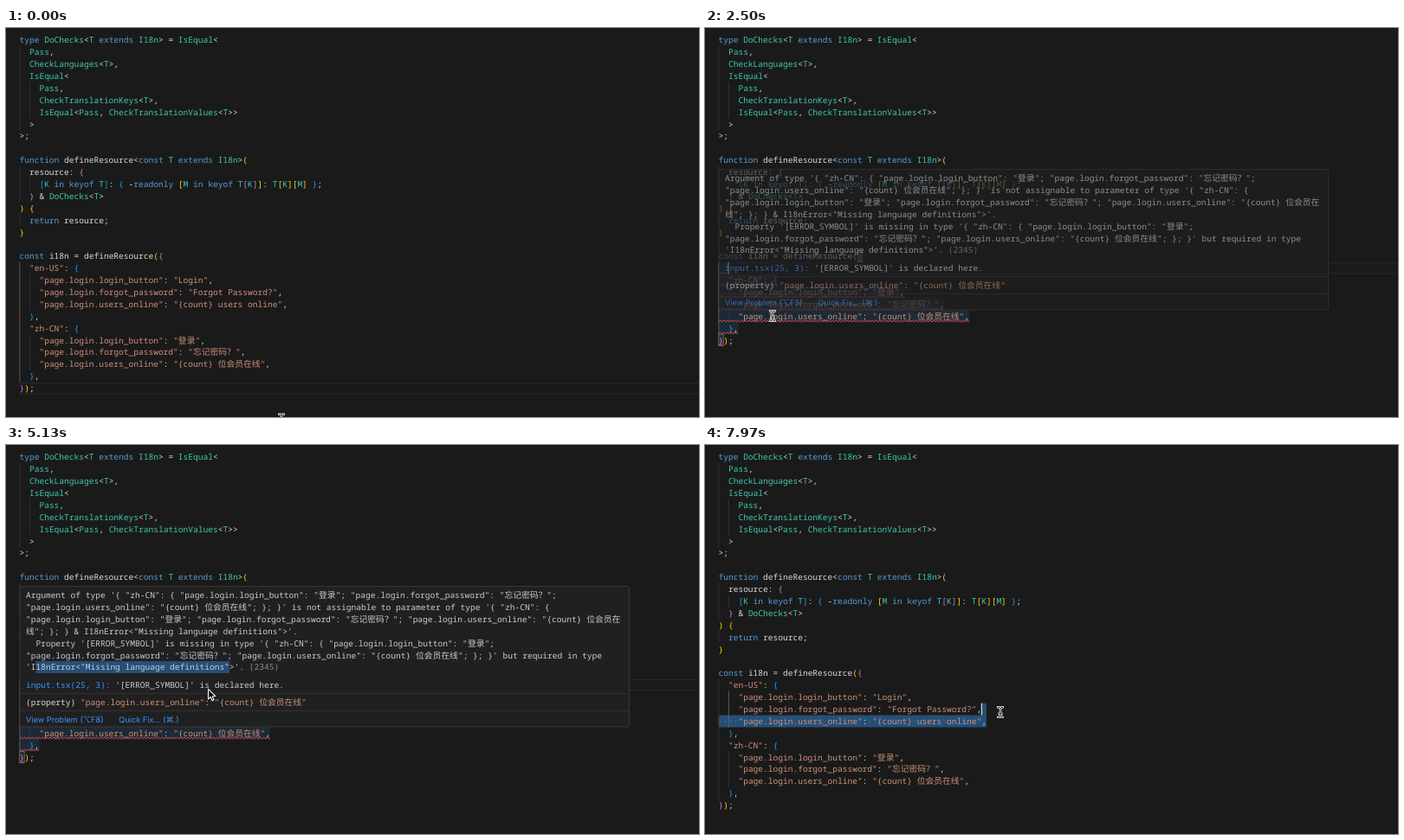
Write an HTML page with a canvas that moves like this. It is 800 px wide and 450 px high and loops after 8 s.

```html
<!DOCTYPE html>
<html lang="en">
<head>
<meta charset="utf-8">
<title>Typed translations</title>
<style>
  html, body { margin: 0; width: 100%; height: 100%; overflow: hidden; background: #1a1a1a; }
  canvas { display: block; }
</style>
</head>
<body>
<canvas id="stage" width="800" height="450"></canvas>
<script>
const ctx = document.getElementById('stage').getContext('2d');
ctx.textRendering = 'geometricPrecision';

const LOOP = 8000;
const LEFT = 15.5, TOP = 6.95, LINE = 13.89, BASE = 10.35;
const CHAR = 5.73, WIDE = 9.78;
const MONO = '9.55px "Noto Sans Mono", monospace';
const CJK = '9.78px "Noto Sans CJK SC", "Noto Sans CJK", sans-serif';
const UI = '9.2px Inter, "DejaVu Sans", sans-serif';
const C = {
  bg: '#1a1a1a', text: '#d8d8d8', keyword: '#569cd6', type: '#3dc9b0', string: '#ce9178',
  brackets: ['#ffd700', '#da70d6', '#179fff'], guide: '#363636', activeGuide: '#686868',
  lineBorder: '#282828', select: '#264f78', hover: 'rgba(38,79,120,.3)', error: '#f14c4c',
  link: '#3794ff', dim: '#8c8c8c'
};

// Moments of the edit
const PRESS = 760, RELEASE = 1300, CUT = 1500, ERROR_ON = 2150, POP_ON = 2430, POP_OFF = 5520,
  POP_DRAG = 3700, POP_DROP = 4600, UNDO = 5930, ERROR_OFF = 6480, CLICK = 6680, PRESS2 = 7550;

const head = `type DoChecks<T extends I18n> = IsEqual<
  Pass,
  CheckLanguages<T>,
  IsEqual<
    Pass,
    CheckTranslationKeys<T>,
    IsEqual<Pass, CheckTranslationValues<T>>
  >
>;

function defineResource<const T extends I18n>(
  resource: {
    [K in keyof T]: { -readonly [M in keyof T[K]]: T[K][M] };
  } & DoChecks<T>
) {
  return resource;
}

const i18n = defineResource({`;
const english = `  "en-US": {
    "page.login.login_button": "Login",
    "page.login.forgot_password": "Forgot Password?",
    "page.login.users_online": "{count} users online",
  },`;
const chinese = `  "zh-CN": {
    "page.login.login_button": "登录",
    "page.login.forgot_password": "忘记密码？",
    "page.login.users_online": "{count} 位会员在线",
  },
});`;

function colorize(line, state) {
  const parts = line.match(/"[^"]*"|\w+|\s+|[^\w\s"]/g) || [];
  return parts.map(s => {
    let color = C.text;
    if (s[0] === '"') color = C.string;
    else if (/^(type|extends|function|const|in|keyof|readonly|return)$/.test(s)) color = C.keyword;
    else if (/^(DoChecks|IsEqual|Pass|Check\w+|I18n|[TKM])$/.test(s)) color = C.type;
    else if (/[([{]/.test(s)) color = C.brackets[state.depth++ % 3];
    else if (/[)\]}]/.test(s)) color = C.brackets[--state.depth % 3];
    return [s, color];
  });
}

function makeDoc(middle) {
  const lines = [head, middle, chinese].join('\n').split('\n');
  const state = { depth: 0 };
  return {
    lines,
    tokens: lines.map(l => colorize(l, state)),
    indents: lines.map(l => l.match(/^ */)[0].length)
  };
}
const fullDoc = makeDoc(english), cutDoc = makeDoc('  ');

const isWide = c => c > '\u2e80';
const widthOf = s => [...s].reduce((w, c) => w + (isWide(c) ? WIDE : CHAR), 0);
const colX = col => LEFT + col * CHAR;
const lineY = n => TOP + n * LINE;
const clamp = (v, a, b) => Math.min(b, Math.max(a, v));

function rect(x, y, w, h, color) {
  ctx.fillStyle = color;
  ctx.fillRect(x, y, w, h);
}

function drawText(tokens, x, y) {
  for (const [text, color] of tokens) {
    ctx.fillStyle = color;
    for (const run of text.match(/[\u2e80-\uffff]+|[^\u2e80-\uffff]+/g) || []) {
      ctx.font = isWide(run[0]) ? CJK : MONO;
      ctx.fillText(run, x, y);
      x += widthOf(run);
    }
  }
}

// Pointer stops: time, x, y
const path = [
  [0, 318, 452.5], [30, 318, 452], [420, 130, 372], [700, 46, 334], [PRESS, 46, 334],
  [RELEASE, 27, 279], [1480, 30, 283], [1830, 72.5, 312], [2050, 78, 334], [2620, 78, 333],
  [3400, 45, 254], [3520, 44.5, 254], [POP_DRAG, 34.5, 257], [POP_DROP, 258, 257],
  [4800, 258, 258], [5100, 233.5, 282], [5180, 233.5, 283], [5520, 216, 332], [5830, 211, 343.5],
  [6200, 211, 343.5], [6540, 210, 320], [6760, 210, 320], [7080, 197, 336], [7160, 197, 336],
  [7480, 324, 321], [PRESS2, 325, 321], [7880, 341, 309], [LOOP, 341, 309]
];

function pointerAt(t) {
  const i = path.findIndex(p => p[0] > t);
  const [t0, x0, y0] = path[i - 1], [t1, x1, y1] = path[i];
  const k = (1 - Math.cos(Math.PI * (t - t0) / (t1 - t0))) / 2;
  return { x: x0 + (x1 - x0) * k, y: y0 + (y1 - y0) * k };
}

function hit(p, doc) {
  const n = clamp(Math.floor((p.y - TOP) / LINE), 0, doc.lines.length - 1);
  return [n, clamp(Math.round((p.x - LEFT) / CHAR), 0, doc.lines[n].length)];
}

// Caret, selection anchor, matched brackets and blink start
function editorAt(t, p, doc) {
  const outer = [[18, 28], [doc.lines.length - 1, 0]], inner = [[19, 11], [23, 2]];
  if (t < PRESS) return { caret: [29, 3], since: -500 };
  if (t < CUT) return { caret: t < RELEASE ? hit(p, doc) : [19, 2], anchor: [23, 4], since: t };
  if (t < UNDO) return { caret: [19, 2], since: CUT, pair: outer };
  if (t < CLICK) return { caret: [19, 2], anchor: [23, 4], since: UNDO };
  if (t < PRESS2) return { caret: [22, 34], since: CLICK, pair: inner };
  return { caret: hit(p, doc), anchor: [22, 54], since: t };
}

function drawGuides(doc, caretLine) {
  const ind = doc.indents;
  const near = Math.max(ind[caretLine], ind[caretLine - 1] || 0, ind[caretLine + 1] || 0);
  const level = near - 2;
  let from = caretLine, to = caretLine;
  if (ind[caretLine] <= level) {
    if ((ind[caretLine + 1] || 0) > level) from = to = caretLine + 1;
    else from = to = caretLine - 1;
  }
  while (ind[from - 1] > level) from--;
  while (ind[to + 1] > level) to++;
  ind.forEach((n, i) => {
    for (let c = 0; c < n; c += 2) {
      const active = c === level && i >= from && i <= to;
      rect(colX(c), lineY(i), 0.8, LINE, active ? C.activeGuide : C.guide);
    }
  });
}

function drawSelection(doc, a, b) {
  const [s, e] = a[0] < b[0] || (a[0] === b[0] && a[1] < b[1]) ? [a, b] : [b, a];
  const dots = [];
  for (let n = s[0]; n <= e[0]; n++) {
    const from = n === s[0] ? s[1] : 0;
    const to = n === e[0] ? e[1] : doc.lines[n].length;
    const x = colX(from), w = (to - from + (n < e[0] ? 1 : 0)) * CHAR;
    ctx.fillStyle = C.select;
    ctx.beginPath();
    ctx.roundRect(x, lineY(n), w, LINE + 0.2, 1.5);
    ctx.fill();
    for (let c = from; c < to; c++) if (doc.lines[n][c] === ' ') dots.push([c, n]);
  }
  for (const [c, n] of dots) rect(colX(c) + 2.4, lineY(n) + 6.6, 1, 1, 'rgba(227,228,226,.35)');
}

function errorRanges(doc) {
  const last = doc.lines.length - 1, list = [];
  for (let n = 18; n <= last; n++) {
    const x = n === 18 ? colX(28) : LEFT;
    const w = n === 18 || n === last ? CHAR : widthOf(doc.lines[n]);
    list.push([x, lineY(n), w]);
  }
  return list;
}

function squiggle(x, y, w) {
  ctx.save();
  ctx.beginPath();
  ctx.rect(x, y, w, LINE + 1);
  ctx.clip();
  ctx.beginPath();
  for (let i = 0; i * 2.09 <= w + 2.1; i++) ctx.lineTo(x + i * 2.09, y + (i % 2 ? 11.7 : 13.4));
  ctx.strokeStyle = C.error;
  ctx.lineWidth = 0.9;
  ctx.stroke();
  ctx.restore();
}

const login = '"page.login.login_button": "登录"; ';
const forgot = '"page.login.forgot_password": "忘记密码？"; ';
const online = '"page.login.users_online": "{count} 位会员在线"';
const message = [
  `Argument of type '{ "zh-CN": { ${login}${forgot}`,
  `${online}; }; }' is not assignable to parameter of type '{ "zh-CN": {`,
  `${login}${forgot}${online.slice(0, -2)}`,
  `线"; }; } & I18nError<"Missing language definitions">'.`,
  `  Property '[ERROR_SYMBOL]' is missing in type '{ "zh-CN": { ${login}`,
  `${forgot}${online}; }; }' but required in type`,
  `'I18nError<"Missing language definitions">'. `
];

function drawPopup(t, p) {
  const x = 23, y = 166.7;
  ctx.save();
  ctx.globalAlpha = clamp((t - POP_ON) / 110, 0, 1);
  ctx.beginPath();
  ctx.roundRect(16, 163.5, 703.5, 162.5, 2);
  ctx.fillStyle = '#202020';
  ctx.fill();
  ctx.strokeStyle = '#3c3c3c';
  ctx.lineWidth = 0.9;
  ctx.stroke();
  rect(16, 287, 703, 0.8, '#363636');
  rect(16, 307.2, 703, 0.8, '#363636');
  if (t >= POP_DRAG) {
    const end = t < POP_DROP ? clamp(Math.round((p.x - x) / CHAR), 2, 41) : 41;
    rect(x + 2 * CHAR, y + 6 * LINE, (end - 2) * CHAR, LINE, C.select);
  }
  message.forEach((line, i) => {
    const row = [[line, '#cccccc']];
    if (i === 6) row.push(['(2345)', C.dim]);
    drawText(row, x, y + i * LINE + BASE);
  });
  drawText([['input.tsx(25, 3):', C.link], [" '[ERROR_SYMBOL]' is declared here.", '#cccccc']], x, 280.6);
  drawText([['(property) ', C.text], ['"page.login.users_online"', C.string], [': ', C.text],
    ['"{count} 位会员在线"', C.string]], x, 301.2);
  ctx.font = UI;
  ctx.fillStyle = C.link;
  ctx.fillText('View Problem (⌥F8)', x, 320.8);
  ctx.fillText('Quick Fix... (⌘.)', 130.3, 320.8);
  ctx.restore();
}

function trace(points) {
  ctx.beginPath();
  points.forEach(([x, y]) => ctx.lineTo(x, y));
}

function drawPointer(p, arrow) {
  ctx.save();
  ctx.translate(p.x, p.y);
  ctx.lineJoin = 'round';
  if (arrow) {
    trace([[0, 0], [0, 11.5], [2.7, 9.1], [4.6, 13.3], [6.5, 12.5], [4.7, 8.4], [8.3, 8.2]]);
    ctx.closePath();
    ctx.fillStyle = '#000';
    ctx.strokeStyle = '#fff';
    ctx.lineWidth = 1.1;
    ctx.fill();
    ctx.stroke();
  } else {
    for (const [color, width] of [['#fff', 2.6], ['#000', 0.9]]) {
      ctx.strokeStyle = color;
      ctx.lineWidth = width;
      ctx.lineCap = 'round';
      trace([[-2.8, -5.7], [-1, -5.5], [0, -4.4], [1, -5.5], [2.8, -5.7]]);
      ctx.stroke();
      trace([[0, -4.4], [0, 4.4]]);
      ctx.stroke();
      trace([[-2.8, 5.7], [-1, 5.5], [0, 4.4], [1, 5.5], [2.8, 5.7]]);
      ctx.stroke();
      trace([[-1.4, 1.7], [1.4, 1.7]]);
      ctx.stroke();
    }
  }
  ctx.restore();
}

function draw(t) {
  const doc = t >= CUT && t < UNDO ? cutDoc : fullDoc;
  const p = pointerAt(t);
  const { caret, anchor, since, pair } = editorAt(t, p, doc);
  const selecting = anchor && (anchor[0] !== caret[0] || anchor[1] !== caret[1]);
  const popup = t >= POP_ON && t < POP_OFF;
  const failing = t >= ERROR_ON && t < ERROR_OFF;
  const caretY = lineY(caret[0]);

  rect(0, 0, 800, 450, C.bg);
  if (!selecting) {
    rect(LEFT, caretY + 0.2, 800, 1.2, C.lineBorder);
    rect(LEFT, caretY + LINE - 1.4, 800, 1.2, C.lineBorder);
  }
  if (popup) errorRanges(doc).forEach(([x, y, w]) => rect(x, y, w, LINE, C.hover));
  if (t >= CLICK + 250 && t < PRESS2) rect(colX(32), lineY(22), 20 * CHAR, LINE, '#434343');
  if (selecting) drawSelection(doc, anchor, caret);
  drawGuides(doc, caret[0]);
  for (const [n, c] of pair || []) {
    rect(colX(c), lineY(n), CHAR, LINE, 'rgba(0,100,0,.1)');
    ctx.strokeStyle = '#808080';
    ctx.lineWidth = 0.75;
    ctx.strokeRect(colX(c) + 0.3, lineY(n) + 0.4, CHAR - 0.4, LINE - 0.8);
  }
  doc.tokens.forEach((row, i) => drawText(row, LEFT, lineY(i) + BASE));
  if (failing) errorRanges(doc).forEach(r => squiggle(...r));
  if ((t - since) % 1000 < 500) rect(colX(caret[1]) - 0.5, caretY, 1.4, LINE, '#c8c8c8');
  if (popup) drawPopup(t, p);
  drawPointer(p, popup && p.y < 326);
}

const start = performance.now();
function tick() {
  draw((performance.now() - start) % LOOP);
  requestAnimationFrame(tick);
}
tick();
</script>
</body>
</html>
```
